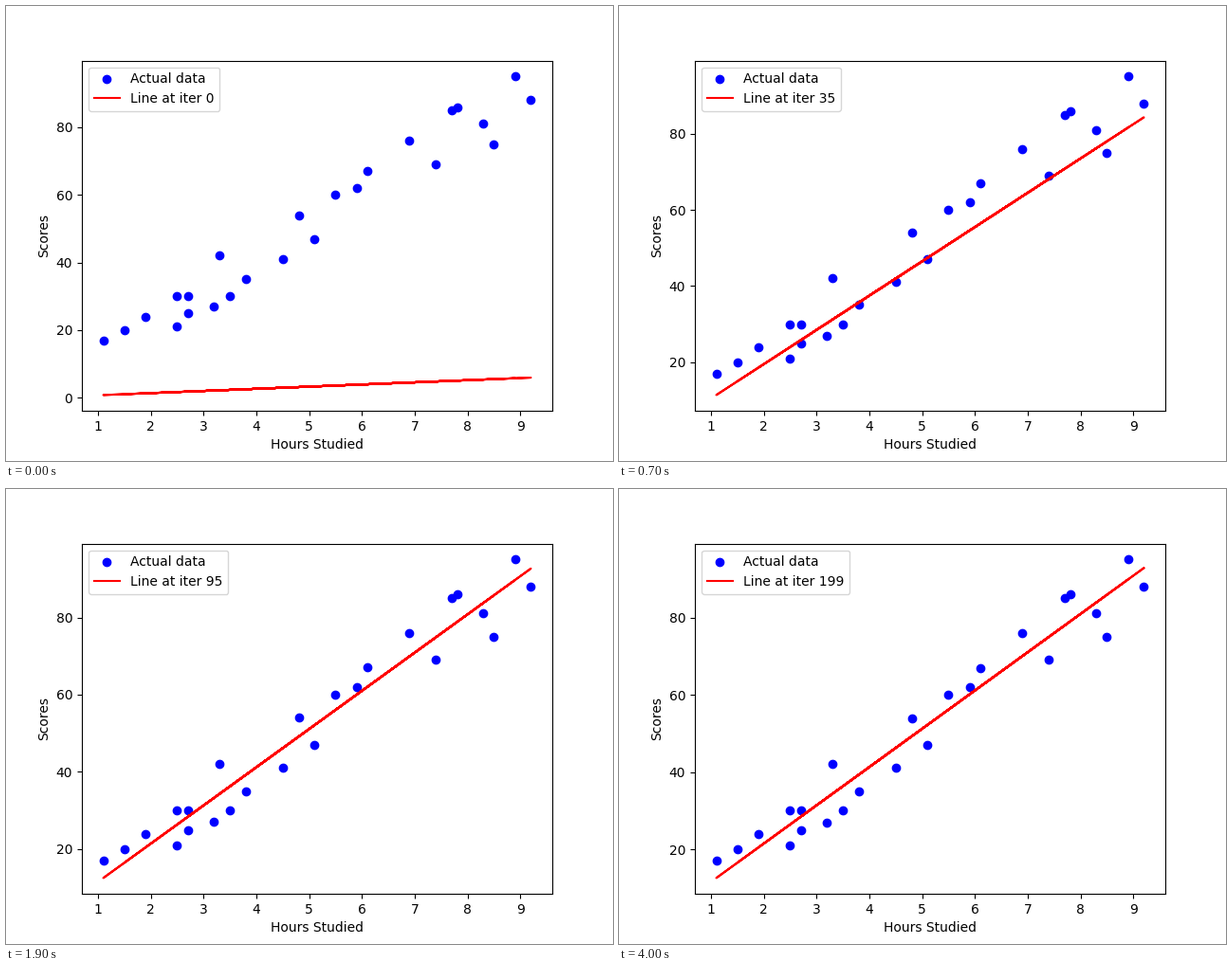
A matplotlib script for the animation above (4.1 s loop, 640 px wide and 480 px high).

```python
import matplotlib.pyplot as plt
import numpy as np
from matplotlib.animation import FuncAnimation

HOURS = np.array([2.5, 5.1, 3.2, 8.5, 3.5, 1.5, 9.2, 5.5, 8.3, 2.7, 7.7, 5.9, 4.5,
                  3.3, 1.1, 8.9, 2.5, 1.9, 6.1, 7.4, 2.7, 4.8, 3.8, 6.9, 7.8])
SCORES = np.array([21, 47, 27, 75, 30, 20, 88, 60, 81, 25, 85, 62, 41,
                   42, 17, 95, 30, 24, 67, 69, 30, 54, 35, 76, 86])
RATE = 0.001
ITERATIONS = 200
STEP = 5


def descend():
    """Return (slope, intercept) after each gradient descent update."""
    slope = intercept = 0.0
    history = []
    for _ in range(ITERATIONS):
        error = SCORES - (slope * HOURS + intercept)
        slope += RATE * 2 * np.mean(HOURS * error)
        intercept += RATE * 2 * np.mean(error)
        history.append((slope, intercept))
    return history


history = descend()
shown = [*range(0, ITERATIONS, STEP), ITERATIONS - 1]

fig, ax = plt.subplots(figsize=(6.4, 4.8), dpi=100)


def draw(frame):
    iteration = shown[frame]
    slope, intercept = history[iteration]
    ax.clear()
    ax.scatter(HOURS, SCORES, color="blue", label="Actual data")
    # Points stay in data order, so the line retraces itself.
    ax.plot(HOURS, slope * HOURS + intercept, color="red",
            label=f"Line at iter {iteration}")
    ax.set_xlabel("Hours Studied")
    ax.set_ylabel("Scores")
    ax.legend(loc="upper left")


anim = FuncAnimation(fig, draw, frames=len(shown), interval=100,
                     init_func=lambda: draw(0), repeat=True, repeat_delay=0)
plt.show()
```
